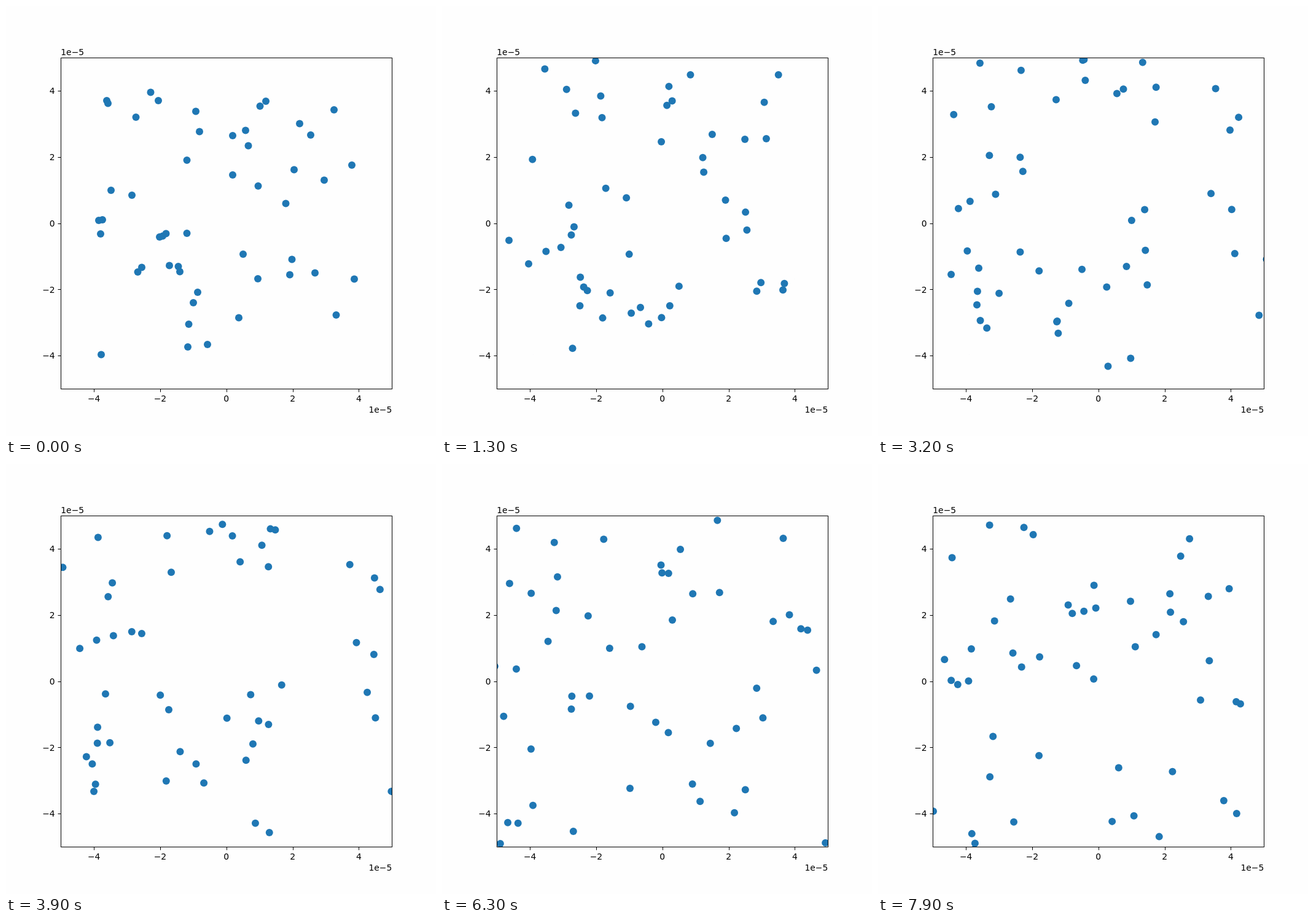
Write an HTML page that moves like this. It is 700x700 px and loops after 8 s.

```html
<!DOCTYPE html>
<html lang="en">
<head>
<meta charset="utf-8">
<title>Wandering particles</title>
<style>
  html, body { margin: 0; width: 100%; height: 100%; overflow: hidden; background: #fefefe; }
  svg { display: block; width: 700px; height: 700px; }
  text { font: 13.89px "DejaVu Sans", sans-serif; }
  .axes { fill: none; stroke: #000; }
  #dots { fill: #1f77b4; }
</style>
</head>
<body>
<svg viewBox="0 0 700 700">
  <clipPath id="plot"><rect x="89.5" y="84.5" width="539" height="539"/></clipPath>
  <g clip-path="url(#plot)"><g id="dots"></g></g>
  <rect class="axes" x="89.5" y="84.5" width="539" height="539"/>
  <g id="ticks"></g>
  <text x="89.3" y="80">1e−5</text>
  <text x="628.3" y="662" text-anchor="end">1e−5</text>
</svg>
<script>
const STEP = 100, STEPS = 80, SPEED = 4.6, WOBBLE = 0.4;
const LEFT = 89.25, RIGHT = 628.25, TOP = 84, BOTTOM = 623;

// x, y of each particle at the start
const start = [
  164, 154, 166, 158.5, 235.5, 140.5, 248, 154, 211.5, 181,
  309, 171.5, 315, 204.5, 369, 211, 390, 202.5, 394.5, 227.5,
  413.5, 163, 423, 155, 478, 191.5, 496, 210, 534, 169,
  563, 259, 518, 283.5, 469, 266.5, 455.5, 321.5, 410.5, 293,
  369, 275, 294.5, 251, 171, 300, 205, 308, 151, 349,
  157, 348, 154, 371, 250, 376, 255, 374.5, 260.5, 370.5,
  294.5, 370, 214.5, 433, 221, 425.5, 266, 422.5, 280.5, 424,
  283, 432.5, 312, 466, 305, 483, 297.5, 518, 296, 555,
  328, 551, 379, 507.5, 386, 404, 410, 444, 465.5, 412.5,
  462, 437.5, 503, 434.5, 567, 444.5, 537.5, 503, 155, 567.5
];

let seed = 7;
function random() {
  seed = (seed * 16807) % 2147483647;
  return seed / 2147483647;
}

function add(parent, tag, attrs, text = "") {
  const el = document.createElementNS("http://www.w3.org/2000/svg", tag);
  for (const key in attrs) el.setAttribute(key, attrs[key]);
  el.textContent = text;
  return parent.appendChild(el);
}

// A walker keeps its speed, turns a little each step and reflects at the walls.
function walk(x, y) {
  let angle = random() * 2 * Math.PI;
  const path = [];
  for (let i = 0; i < STEPS; i++) {
    path.push([x, y]);
    angle += (random() * 2 - 1) * WOBBLE;
    let vx = Math.cos(angle), vy = Math.sin(angle);
    if (x < LEFT) vx = Math.abs(vx);
    if (x > RIGHT) vx = -Math.abs(vx);
    if (y < TOP) vy = Math.abs(vy);
    if (y > BOTTOM) vy = -Math.abs(vy);
    angle = Math.atan2(vy, vx);
    x += vx * SPEED;
    y += vy * SPEED;
  }
  return path;
}

const dots = document.getElementById("dots");
const walkers = [];
for (let i = 0; i < start.length; i += 2) {
  walkers.push({ path: walk(start[i], start[i + 1]), el: add(dots, "circle", { r: 6 }) });
}

const ticks = document.getElementById("ticks");
const snap = v => Math.floor(v + 0.5) + 0.5;
for (let n = -4; n <= 4; n += 2) {
  const x = 358.75 + n * 53.9, y = 353.5 - n * 53.9;
  const label = String(n).replace("-", "−");
  add(ticks, "path", { class: "axes", d: `M${snap(x)} 624v4.5M89 ${snap(y)}h-4.5` });
  add(ticks, "text", { x, y: 644, "text-anchor": "middle" }, label);
  add(ticks, "text", { x: 79.6, y: y + 5.3, "text-anchor": "end" }, label);
}

function draw(now) {
  const step = Math.floor(now / STEP) % STEPS;
  for (const { path, el } of walkers) {
    el.setAttribute("cx", path[step][0]);
    el.setAttribute("cy", path[step][1]);
  }
}

let origin;
function tick(now) {
  origin ??= now;
  draw(now - origin);
  requestAnimationFrame(tick);
}
draw(0);
requestAnimationFrame(tick);
</script>
</body>
</html>
```
